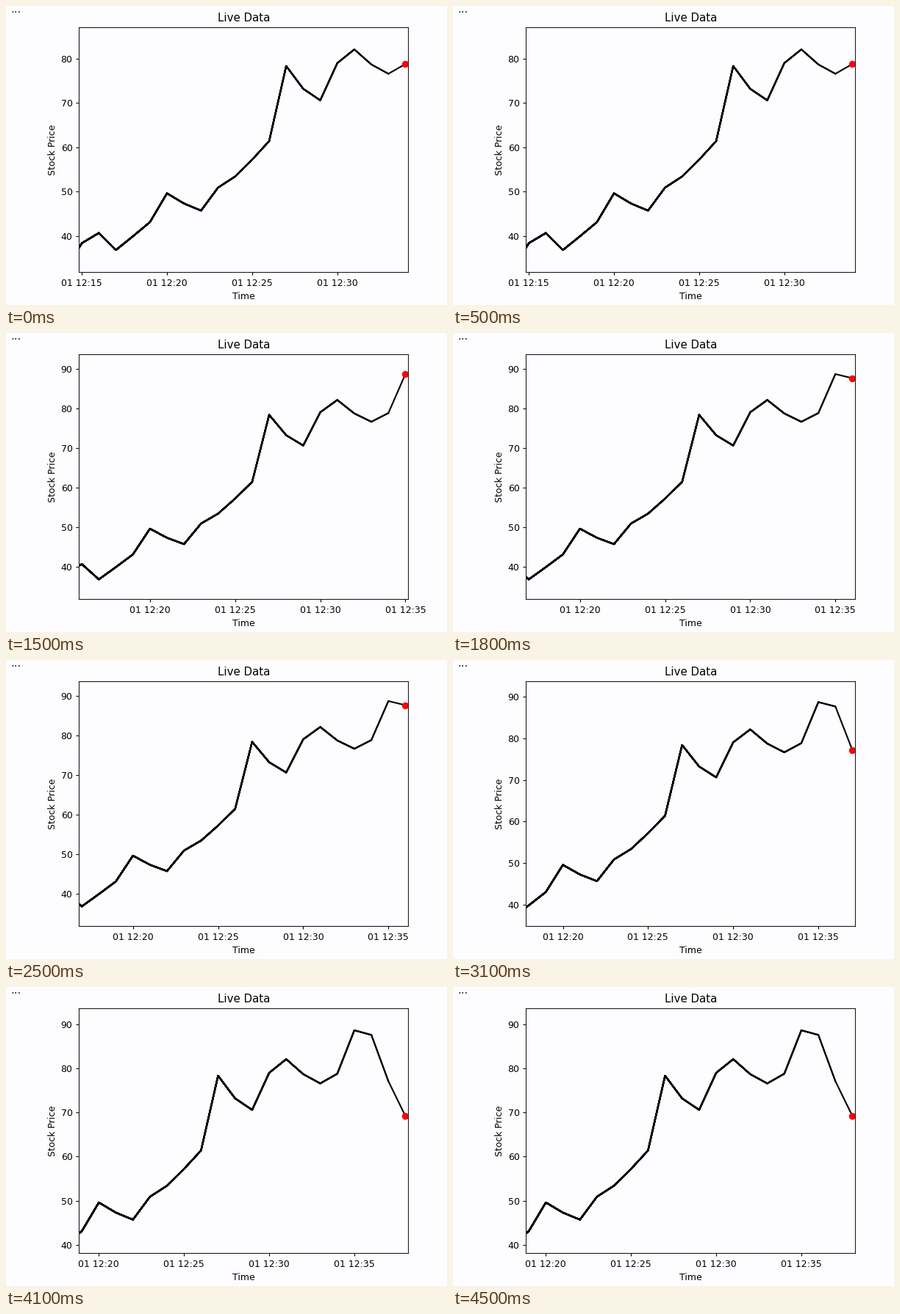
Write a matplotlib script that moves like this. It is 600 px wide and 408 px high and loops after 5 s.

```python
import matplotlib.pyplot as plt
from matplotlib.animation import FuncAnimation
from matplotlib.lines import Line2D
from matplotlib.ticker import MultipleLocator

W, H, DPI = 600, 408, 100
SCALE = 0.9032  # default chart sizes, shrunk to this stage
INTERVAL, FRAMES = 100, 50
BG, RED = "#fdfcfe", "#fb0207"
LEFT, RIGHT, TOP, BOTTOM = 99.3, 547.3, 29.0, 363.2

FIRST = 14  # minute of the first price
PRICES = [32.0, 38.35, 40.65, 36.8, 39.9, 43.1, 49.6, 47.3, 45.7, 50.9,
          53.4, 57.2, 61.4, 78.35, 73.2, 70.6, 79.0, 82.1, 78.7, 76.6,
          78.8, 88.65, 87.6, 77.1, 69.2]
MINUTES = [FIRST + i for i in range(len(PRICES))]
START = 21  # prices known when the loop begins
WINDOW = 20  # prices that set the vertical range
UPDATES = (700, 1800, 3100, 4100)  # ms at which a new price arrives

plt.rcParams.update({
    "font.family": "DejaVu Sans",
    "font.size": 10 * SCALE,
    "axes.titlesize": 12 * SCALE,
    "axes.titlepad": 6 * SCALE,
    "axes.labelpad": 4 * SCALE,
    "axes.linewidth": 0.8,
    "axes.edgecolor": "#1c1c1c",
    "lines.linewidth": 1.5,
})
for axis in ("xtick", "ytick"):
    plt.rcParams.update({
        f"{axis}.major.size": 3.5 * SCALE,
        f"{axis}.major.pad": 3.5 * SCALE,
        f"{axis}.major.width": 0.8,
    })

fig = plt.figure(figsize=(W / DPI, H / DPI), dpi=DPI, facecolor=BG)
ax = fig.add_axes([LEFT / W, 1 - BOTTOM / H,
                   (RIGHT - LEFT) / W, (BOTTOM - TOP) / H], facecolor=BG)
ax.set_title("Live Data")
ax.set_xlabel("Time")
ax.set_ylabel("Stock Price")
ax.xaxis.set_major_locator(MultipleLocator(5))
ax.xaxis.set_major_formatter(lambda m, _: f"01 12:{m:02.0f}")
ax.yaxis.set_major_locator(MultipleLocator(10))

fig.text(6.2 / W, 1 - 8.8 / H, "...", fontsize=10.8, color="#222222")
fig.add_artist(Line2D([599.5 / W] * 2, [0, 1], color="#a8a8a8", lw=0.72))

# Every update redraws the whole line on top, so older parts look heavier.
lines = [ax.plot(MINUTES[:n], PRICES[:n], color="black")[0]
         for n in range(2, len(PRICES) + 1)]
dot = ax.scatter([MINUTES[0]], [PRICES[0]], s=36 * SCALE ** 2,
                 color=RED, linewidths=1.5 * SCALE, zorder=2.2)


def draw(frame):
    count = START + sum(frame * INTERVAL >= t for t in UPDATES)
    for n, line in enumerate(lines, start=2):
        line.set_visible(n <= count)
    now, price = MINUTES[count - 1], PRICES[count - 1]
    dot.set_offsets([(now, price)])
    recent = PRICES[count - WINDOW:count]
    ax.set_xlim(now - 1150 / 60, now + 10 / 60)
    ax.set_ylim(min(recent) - 5, max(recent) + 5)
    return [*lines, dot]


anim = FuncAnimation(fig, draw, frames=FRAMES, interval=INTERVAL,
                     repeat=True, repeat_delay=0, blit=False)
plt.show()
```
